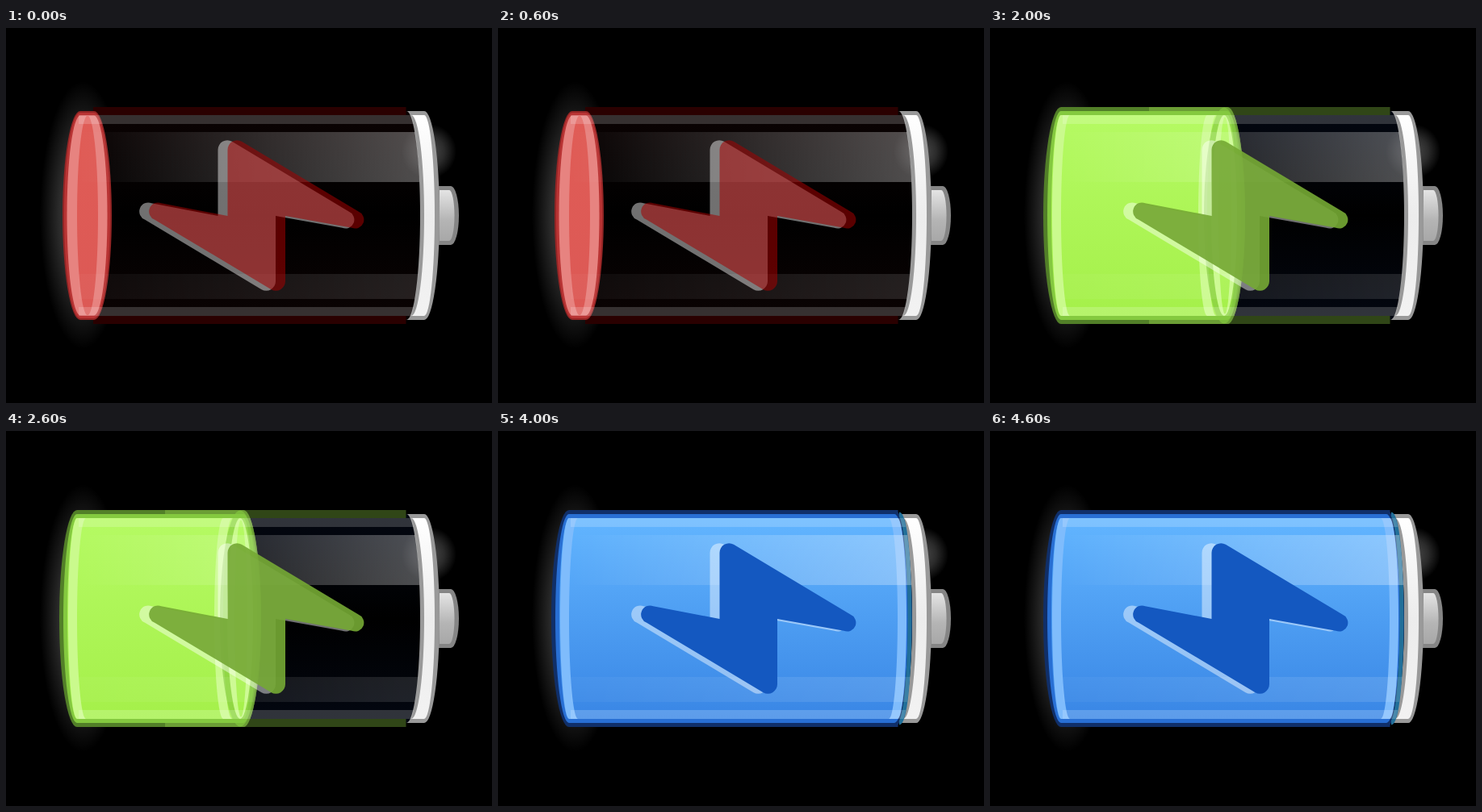
Animation of 602 by 465 pixels, one loop 5000 ms. Source, as an HTML page:

```html
<!DOCTYPE html>
<html lang="en">
<head>
<meta charset="utf-8">
<title>Charging battery</title>
<style>
html, body { margin: 0; width: 100%; height: 100%; overflow: hidden; background: #000; }
svg { display: block; width: 100vw; height: 100vh; }
</style>
</head>
<body>
<svg viewBox="0 0 602 465">
  <defs>
    <radialGradient id="glow">
      <stop offset="0" stop-color="#fff" stop-opacity=".3"/>
      <stop offset=".55" stop-color="#fff" stop-opacity=".17"/>
      <stop offset="1" stop-color="#fff" stop-opacity="0"/>
    </radialGradient>
    <linearGradient id="shine">
      <stop offset="0" stop-color="#fff" stop-opacity="0"/>
      <stop offset="1" stop-color="#fff" stop-opacity=".3"/>
    </linearGradient>
    <linearGradient id="lowShine">
      <stop offset="0" stop-color="#fff" stop-opacity=".03"/>
      <stop offset="1" stop-color="#fff" stop-opacity=".12"/>
    </linearGradient>
    <linearGradient id="inside" x2="0" y2="1">
      <stop class="tint" offset="0"/>
      <stop offset=".5" stop-color="#000"/>
      <stop class="tint" offset="1"/>
    </linearGradient>
    <linearGradient id="charge" x2="0" y2="1">
      <stop id="chargeTop" offset="0"/>
      <stop id="chargeBottom" offset="1"/>
    </linearGradient>
    <linearGradient id="metal" x2="0" y2="1">
      <stop offset="0" stop-color="#fff"/>
      <stop offset=".5" stop-color="#ececec"/>
      <stop offset="1" stop-color="#f2f2f2"/>
    </linearGradient>
    <linearGradient id="nub" x2="0" y2="1">
      <stop offset="0" stop-color="#e4e4e4"/>
      <stop offset=".6" stop-color="#b4b4b4"/>
      <stop offset="1" stop-color="#a8a8a8"/>
    </linearGradient>
    <clipPath id="tube"><path d="M88 98H496A17 134.5 0 0 1 496 367H88A22 134.5 0 0 1 88 98Z"/></clipPath>
    <path id="bolt" d="M274.5 151A11.7 11.7 0 0 1 292 140.8L436.5 227.6A10.8 10.8 0 0 1 428.5 247.8L346 233V314A11.7 11.7 0 0 1 328.5 324.2L184.2 237.8A10.8 10.8 0 0 1 192.3 217.2L274.5 233Z"/>
  </defs>
  <rect width="602" height="465"/>
  <ellipse cx="95" cy="232" rx="53" ry="166" fill="url(#glow)"/>
  <circle cx="524" cy="153" r="34" fill="url(#glow)"/>
  <path d="M532 196H551A10 36.5 0 0 1 551 269H532Z" fill="#858585"/>
  <path d="M537 201H549A6.5 31.5 0 0 1 549 264H537Z" fill="url(#nub)"/>
  <path d="M480 103H518A19 129.5 0 0 1 518 362H480Z" fill="#999"/>
  <path d="M502 108H518A13 124.5 0 0 1 518 357H502A16 124.5 0 0 0 502 108Z" fill="url(#metal)"/>
  <path d="M106 103H496A17 129.5 0 0 1 496 362H106Z" fill="url(#inside)"/>
  <circle cx="524" cy="153" r="34" fill="url(#glow)" clip-path="url(#tube)" opacity=".5"/>
  <path id="rails" d="M108 98H495.500V108H108ZM108 357H495.500V367H108Z"/>
  <g id="fill"></g>
  <g clip-path="url(#tube)">
    <path d="M90 108H515V119H90ZM90 346H515V357H90Z" fill="#fff" fill-opacity=".18"/>
    <rect x="90" y="129" width="425" height="62" fill="url(#shine)"/>
    <rect x="90" y="305" width="425" height="31" fill="url(#lowShine)"/>
  </g>
  <use href="#bolt" x="-12" fill="#fff" fill-opacity=".44"/>
  <use id="face" href="#bolt"/>
</svg>
<script>
const STEP = 1000;
const states = [
  { right: 131, edge: '#942525', mid: '#b93434', top: '#e05c56', bottom: '#dc5955', pale: '#e78380',
    rail: '#2a0000', tint: '#0b0303', bolt: '#a50000', alpha: .55 },
  { right: 219, edge: '#65400c', mid: '#cc881c', top: '#fadb65', bottom: '#dfa733', pale: '#fae08a',
    rail: '#371d00', tint: '#0a0602', bolt: '#c78113', alpha: .92, disc: true },
  { right: 316, edge: '#527f28', mid: '#84c93f', top: '#b5fa63', bottom: '#a5f04a', pale: '#cafa8d',
    rail: '#304617', tint: '#030711', bolt: '#75a934', alpha: .91, disc: true, lip: '#6b9d35' },
  { right: 443, edge: '#20823a', mid: '#3cd45d', top: '#62ff7e', bottom: '#48ec9a', pale: '#80f9a0',
    rail: '#14451c', tint: '#030603', bolt: '#21c850', alpha: .97, lip: '#24a446' },
  { right: 513, edge: '#102f69', mid: '#286fd4', top: '#62b5ff', bottom: '#3986e5', pale: '#7fbcfc',
    rail: '#102f69', tint: '#02050b', bolt: '#1458c0', alpha: 1, rim: '#216f99' }
];
const find = id => document.getElementById(id);
const path = (d, fill, alpha = 1) => `<path d="${d}" fill="${fill}" fill-opacity="${alpha}"/>`;
const oval = (cx, rx, ry, fill, alpha = 1) =>
  `<ellipse cx="${cx}" cy="232.500" rx="${rx}" ry="${ry}" fill="${fill}" fill-opacity="${alpha}"/>`;

// Cylinder silhouette; inset shrinks it on every side.
function shell(left, right, half, inset) {
  const rx = 22 - inset, ry = half - inset, y = 232.5 - ry;
  const a = left + 22, b = right - 22;
  return `M${a} ${y}H${b}A${rx} ${ry} 0 0 1 ${b} ${y + 2 * ry}H${a}A${rx} ${ry} 0 0 1 ${a} ${y}Z`;
}

// Thin bowed highlight; dir -1 bows left, 1 bows right.
function crescent(x, dir) {
  const end = x - dir * 11, tip = end - dir * 11;
  const out = dir > 0 ? 1 : 0;
  return `M${end} 108A11 124.500 0 0 ${out} ${end} 357H${tip}A11 124.500 0 0 ${1 - out} ${tip} 108Z`;
}

function charge(s) {
  const { right, edge, mid, pale } = s;
  if (right < 140) {
    return path(shell(70, right, 129.5, 0), edge) +
      path(shell(70, right, 129.5, 2), mid) +
      path(shell(70, right, 129.5, 5.5), pale) +
      oval(101, 13, 124, 'url(#charge)');
  }
  let out = path(shell(66, right, 134.5, 0), edge);
  if (s.lip) {
    const b = right - 22;
    out += path(`M197 98H${b}A22 134.500 0 0 1 ${b} 367H197Z`, s.lip);
  }
  out += path(shell(66, right, 134.5, 5), mid) +
    path(shell(66, right, 134.5, 10), 'url(#charge)') +
    path(crescent(77, -1), pale);
  if (s.disc) {
    const cx = right - 26;
    out += path(crescent(right - 62 + (right > 300 ? 4 : 0), -1), pale) +
      oval(cx, 25, 134, mid, .65) +
      oval(cx, 16, 124.5, pale) +
      oval(cx + 1, 8, 122, 'url(#charge)');
  } else {
    out += path(crescent(right - 7, 1), pale);
  }
  if (s.rim) {
    out += `<path d="M497 103A13 129.500 0 0 1 497 362" fill="none" stroke="${s.rim}" stroke-width="5"/>`;
  }
  return out;
}

function show(s) {
  find('chargeTop').setAttribute('stop-color', s.top);
  find('chargeBottom').setAttribute('stop-color', s.bottom);
  document.querySelectorAll('.tint').forEach(e => e.setAttribute('stop-color', s.tint));
  find('rails').setAttribute('fill', s.rail);
  find('face').setAttribute('fill', s.bolt);
  find('face').setAttribute('fill-opacity', s.alpha);
  find('fill').innerHTML = charge(s);
}

let shown = -1;
const start = performance.now();
function tick() {
  const index = Math.floor((performance.now() - start) / STEP) % states.length;
  if (index !== shown) show(states[shown = index]);
  requestAnimationFrame(tick);
}
tick();
</script>
</body>
</html>
```
